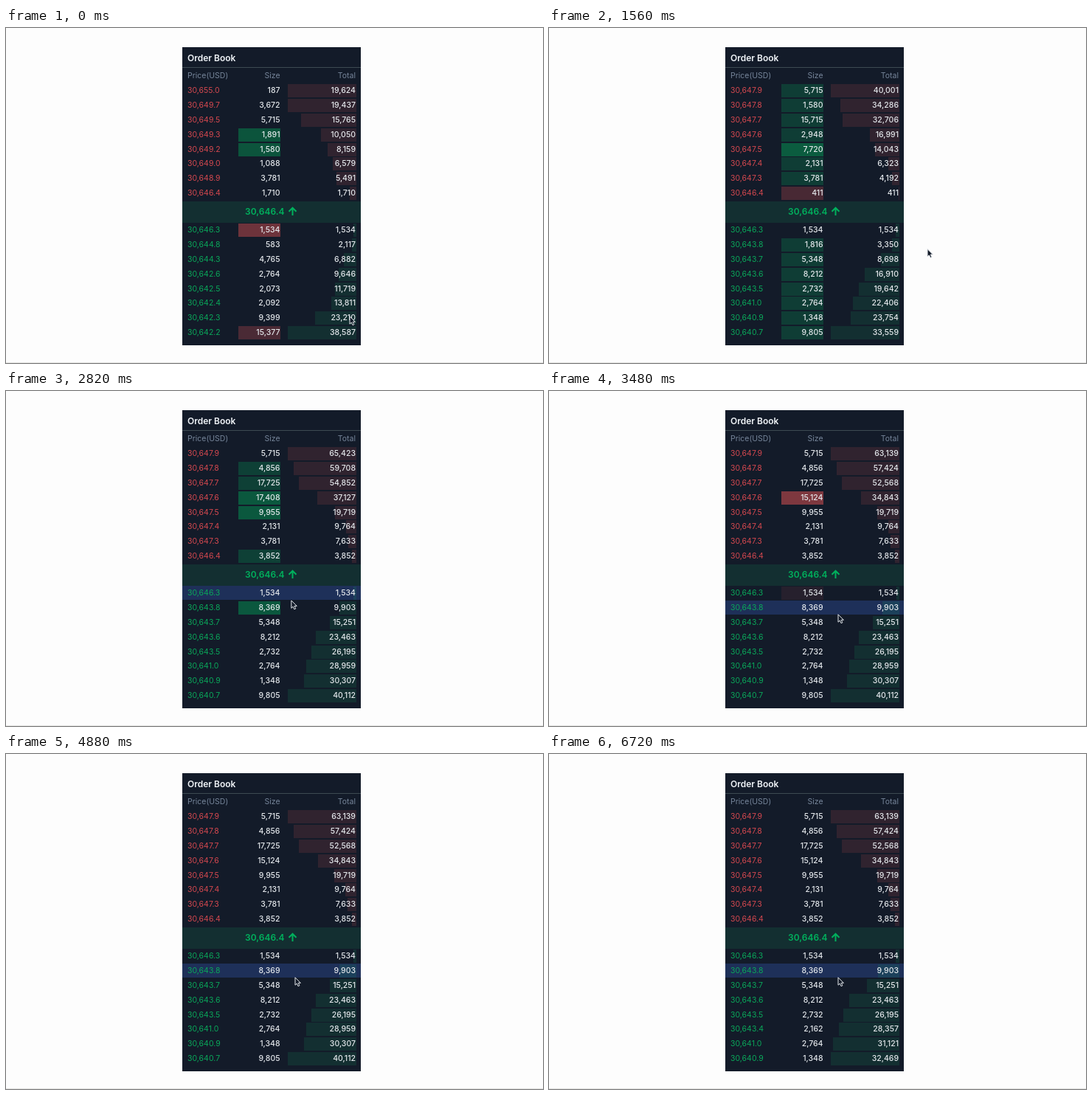
An HTML page for the animation above (8000 ms loop, 728 px wide and 454 px high).

```html
<!DOCTYPE html>
<html lang="en">
<head>
<meta charset="utf-8">
<title>Order Book</title>
<style>
  html, body { margin: 0; width: 100%; height: 100%; overflow: hidden; background: #fdfdfd; }
  body { position: relative; font: 10.5px/20px Inter, "Open Sans", sans-serif; }
  body::after { content: ""; position: absolute; left: 0; right: 0; top: 453px; height: 1px; background: #e6e6e4; }
  .panel { position: absolute; left: 239px; top: 26px; width: 241.5px; height: 404px; background: #131b29; overflow: hidden; }
  .title { position: absolute; left: 7px; top: 4.5px; font-size: 12px; font-weight: 600; color: #f0f4f8; }
  .rule { position: absolute; left: 0; right: 0; top: 27px; height: 1px; background: #3d4a52; }
  .row { position: absolute; left: 0; width: 100%; height: 20px; white-space: nowrap; color: #e4e8ec; }
  .row > * { position: absolute; top: 0; }
  .head { color: #76859a; }
  .price { left: 7px; }
  .ask .price { color: #d4484f; }
  .bid .price { color: #0aa75a; }
  .size { right: 109px; }
  .total { right: 6.5px; }
  .row:not(.head) > .size, .row:not(.head) > .total { font-weight: 500; }
  .row > .hover { inset: 0 0 1px; background: #1e3059; visibility: hidden; }
  .row > .bar { right: 6px; top: 1px; height: 18px; }
  .ask > .bar { background: rgba(255, 90, 90, .12); }
  .bid > .bar { background: rgba(16, 186, 104, .12); }
  .row > .flash { left: 75.5px; width: 57px; top: 1px; height: 18px; }
  .flash.up { background: rgba(0, 177, 93, .5); }
  .flash.down { background: rgba(255, 91, 90, .5); }
  .last { position: absolute; left: 0; right: 0; top: 208.5px; height: 29px; background: rgba(16, 186, 104, .12); color: #00b15d; font: 600 12px/28px Inter, "Open Sans", sans-serif; }
  .last span { position: absolute; left: 85px; }
  .last svg { position: absolute; left: 143px; top: 7px; }
  #cursor { position: absolute; left: 0; top: 0; }
</style>
</head>
<body>
<div class="panel" id="panel">
  <div class="title">Order Book</div>
  <div class="rule"></div>
  <div class="row head" style="top:28.8px">
    <span class="price">Price(USD)</span><span class="size">Size</span><span class="total">Total</span>
  </div>
  <div class="last">
    <span>30,646.4</span>
    <svg width="13" height="13" fill="none" stroke="#00b15d" stroke-width="2"><path d="M6.5 12V2M1.5 6.7l5-5 5 5"/></svg>
  </div>
</div>
<svg id="cursor" width="11" height="15"><path d="M1 .8v10.4l2.3-2.1 1.7 3.6 1.9-.9-1.7-3.5h3.2z" fill="#131b29" stroke="#e4e8ec"/></svg>
<script>
const LOOP = 8000, FADE = 740, DEPTH = 8, BAR = 93, PITCH = 19.9;
const SPREAD = 646.35;      // levels above are asks, below are bids
const BID_TOP = 237.9, ASK_TOP = 48.9;
const HOVER_LAG = 200;
const panel = document.getElementById('panel');
const cursor = document.getElementById('cursor');

// Changed levels as "price:size". A raised or new level flashes green, any other red.
const feed = [
  { t: -1000, set: '655.0:187 649.7:3672 649.5:5715 649.0:1088 648.9:3781 646.4:1710 '
    + '646.3:1534 644.8:583 644.3:4765 642.6:2764 642.5:2073 642.4:2092 642.3:9399 642.2:15377' },
  { t: -400, set: '642.2:15377' },
  { t: -180, set: '649.3:1891 649.2:1580 646.3:1534' },
  { t: 460, set: '649.0:2131 646.3:1534 646.2:16 644.6:2732 644.2:8212' },
  { t: 830, set: '653.7:13824' },
  { t: 1150, drop: [642, 646.25], set: '647.3:3781 647.4:2131 647.6:2948 647.7:15715 647.8:1580 647.9:5715 646.4:411 '
    + '643.8:1816 643.7:5348 643.6:8212 643.5:2732 641.0:2764 640.9:1348 640.7:9805' },
  { t: 1450, set: '647.5:7720' },
  { t: 1840, set: '647.8:2275 646.3:1534' },
  { t: 2450, set: '647.8:4856 647.7:17725 646.4:3852' },
  { t: 2680, set: '647.6:17408 647.5:9955 643.8:8369' },
  { t: 2860, set: '646.3:1534' },
  { t: 3410, set: '647.6:15124' },
  { t: 5020, set: '643.4:1262 646.3:1534' },
  { t: 5840, set: '643.4:2162 646.3:1534' }
];

// time, x, y of the pointer tip
const path = [[0, 466, 391], [860, 462, 388], [1540, 514, 300], [1930, 400, 266],
  [2120, 380, 259], [3400, 392, 303], [LOOP, 392, 303]];

const group = n => String(n).replace(/\B(?=(\d{3})+$)/g, ',');

// Apply the feed up to time t; each level keeps its size and last change.
function bookAt(t) {
  const book = new Map();
  for (const { t: at, drop, set } of feed) {
    if (at > t) break;
    if (drop)
      for (const p of book.keys()) if (p > drop[0] && p < drop[1]) book.delete(p);
    for (const item of set.split(' ')) {
      const [price, size] = item.split(':').map(Number);
      const old = book.get(price);
      book.set(price, { price, size, at, up: !old || size > old.size });
    }
  }
  return [...book.values()];
}

// The levels nearest the spread, best first, with running totals.
function ladder(book, isAsk) {
  let sum = 0;
  const rows = book.filter(r => r.price > SPREAD === isAsk)
    .sort((a, b) => isAsk ? a.price - b.price : b.price - a.price)
    .slice(0, DEPTH)
    .map(r => ({ ...r, total: sum += r.size }));
  for (const r of rows) r.share = r.total / sum;
  return rows;
}

function makeRow(kind, top) {
  const el = document.createElement('div');
  el.className = 'row ' + kind;
  el.style.top = top + 'px';
  const parts = {};
  for (const name of ['hover', 'bar', 'flash', 'price', 'size', 'total']) {
    parts[name] = el.appendChild(document.createElement('span'));
    parts[name].className = name;
  }
  panel.append(el);
  return parts;
}

const makeSide = (kind, top) => Array.from({ length: DEPTH }, (_, i) => makeRow(kind, top + i * PITCH));
const asks = makeSide('ask', ASK_TOP).reverse();
const bids = makeSide('bid', BID_TOP);

const setText = (el, text) => { if (el.textContent !== text) el.textContent = text; };

function drawSide(views, rows, t) {
  rows.forEach((r, i) => {
    const v = views[i];
    setText(v.price, '30,' + r.price.toFixed(1));
    setText(v.size, group(r.size));
    setText(v.total, group(r.total));
    v.bar.style.width = r.share * BAR + 'px';
    v.flash.className = 'flash ' + (r.up ? 'up' : 'down');
    v.flash.style.opacity = Math.max(0, 1 - (t - r.at) / FADE);
  });
}

function pointerAt(t) {
  const i = path.findIndex(p => p[0] > t);
  const [t0, x0, y0] = path[i - 1], [t1, x1, y1] = path[i];
  const k = (t - t0) / (t1 - t0), e = k * k * (3 - 2 * k);
  return [x0 + (x1 - x0) * e, y0 + (y1 - y0) * e];
}

function drawPointer(t) {
  const [x, y] = pointerAt(t);
  cursor.style.transform = `translate(${x - 1}px, ${y - 1}px)`;
  const [hx, hy] = pointerAt(Math.max(0, t - HOVER_LAG));
  const inside = t > HOVER_LAG && hx < 480;
  const row = Math.floor((hy - 26 - BID_TOP) / PITCH);
  bids.forEach((v, i) => { v.hover.style.visibility = inside && i === row ? 'visible' : 'hidden'; });
}

const start = performance.now();
function frame() {
  const t = (performance.now() - start) % LOOP;
  const book = bookAt(t);
  drawSide(asks, ladder(book, true), t);
  drawSide(bids, ladder(book, false), t);
  drawPointer(t);
  requestAnimationFrame(frame);
}
frame();
</script>
</body>
</html>
```
